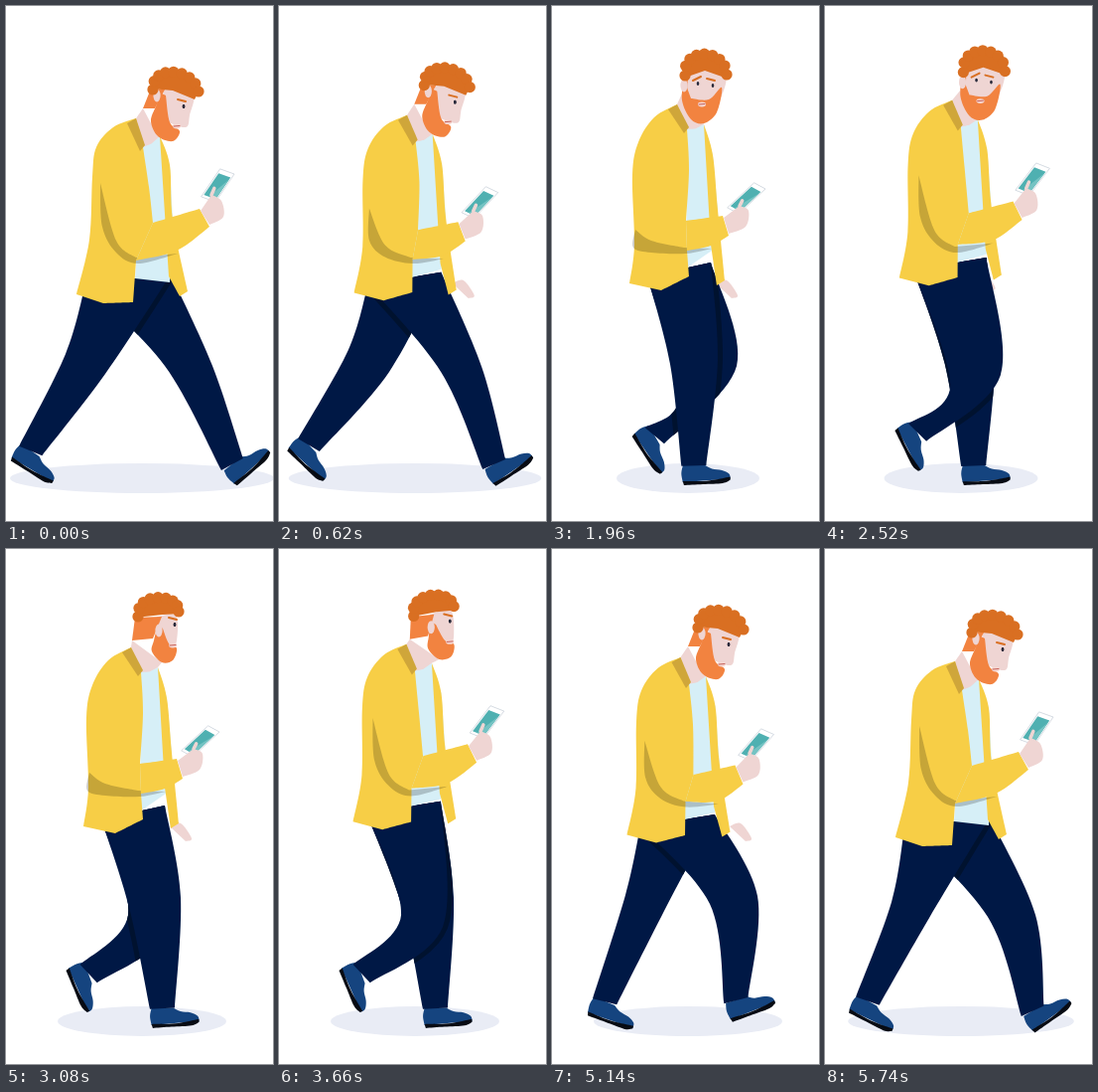
These frames come from a looping animation (269 by 518 pixels, 5760 ms). An HTML page with a canvas:

```html
<!DOCTYPE html>
<html lang="en">
<head>
<meta charset="utf-8">
<title>Walking with a phone</title>
<style>
html, body { margin: 0; width: 100%; height: 100%; overflow: hidden; background: #fff; }
canvas { display: block; width: 269px; height: 518px; }
</style>
</head>
<body>
<canvas id="stage"></canvas>
<script>
const W = 269, H = 518, LOOP = 5760, STEP = 580, TICK = 20;
const canvas = document.getElementById('stage');
const ctx = canvas.getContext('2d');
const ratio = window.devicePixelRatio || 1;
canvas.width = W * ratio;
canvas.height = H * ratio;

const YELLOW = '#f7ce46', NAVY = '#001845', DARK_NAVY = '#00122f', SHOE = '#15447f', SOLE = '#070b14';
const SKIN = '#efd5d3', HAIR = '#d96f22', BEARD = '#f28340', SHIRT = '#d6eff7';

// Two torso poses: phone raised while leaning, and upright with the arm low.
const TRUNK = { back: 6, hem: 3, edge: 2, panel: 5, hips: 2 };
const ARM = { cuff: 4, hand: 3, phone: 3 };
const trunkLean = [
  131,113, 108,122, 91,142, 87,172, 84,235, 71,290,
  98,299, 128,298, 131,256, 144,182, 138,142,
  155,131, 165,160, 168,215, 183,287, 164,272, 80,280, 166,270];
const trunkTall = [
  126,99, 103,112, 87,137, 81,170, 83,240, 78,279,
  110,286, 138,272, 136,246, 138,165, 136,124,
  153,119, 162,150, 167,205, 174,276, 160,240, 96,272, 160,258];
const armHigh = [148,218, 195,204, 205,222, 172,246, 219,212, 217,196, 207,190, 216,164, 230,169, 197,192];
const armLow = [135,216, 172,211, 178,231, 160,241, 195,222, 198,206, 189,201, 204,178, 215,184, 177,203];
const shadeHigh = [95,178, 97,222, 111,248, 133,259];
const shadeLow = [84,225, 82,243, 100,248, 135,249];

// Phase in steps: upright, shift x, shift y, arm low, arm drop, far hand shift.
const BODY = [
  [0, 0, 0, 0, 0, 0, -30], [.138, .25, 0, -7, .1, 0, -30], [.45, .65, 0, -10, .3, 2, -8],
  [.862, .5, 1, 3, .5, 7, 14], [1, .4, 1, 7, .6, 5, 12], [1.138, .75, .5, 1.5, .75, 3, 7],
  [1.31, 1, 0, 0, 1, 0, 0], [1.379, 1, 0, 0, 1, 0, 0], [1.65, .5, 0, -2, .5, 0, -14],
  [1.897, 0, 0, 0, 0, 0, -30]];

// Phase: knee x, y, half width, tilt, heel x, y, sole angle.
const LEG = [
  [0, 184,362, 24, 0, 232,483, -41], [.138, 181,369, 18, -5, 196,484, -23],
  [.31, 150,355, 26, -5, 147,482, -4], [.379, 143,358, 24, -2, 132,482, -3],
  [.862, 92,359, 18, 11, 35,469, 20], [.897, 86,363, 19, 8, 23,466, 27],
  [1, 80,360, 20, 10, 4,457, 32], [1.138, 105,357, 21, 11, 18,437, 55],
  [1.31, 144,374, 21, 6, 60,423, 67], [1.379, 157,377, 29, -15, 80,432, 57],
  [1.6, 174,364, 24, -11, 140,462, 15], [1.862, 183,353, 24, -4, 181,476, -20],
  [1.897, 188,369, 24, -1, 211,487, -35]];

const SHADOW = [[0, 133], [.138, 116], [.31, 85], [.379, 72], [.6, 66], [.862, 95], [.897, 114]];

const HEAD = { curve: 4, fringe: 3, side: 3, ear: 1, face: 5, beard: 8, eyes: 2, mouth: 1 };
const down = [
  140,68, 138,42, 182,46, 186,70, 182,78, 160,69, 138,67,
  130,87, 142,87, 152,68, 144,74,
  150,67, 180,71, 177,94, 173,106, 153,100,
  149,72, 143,85, 138,100, 145,115, 160,120, 167,110, 157,101, 153,74,
  171,85, 171,85, 164,105];
const front = [
  134,70, 130,40, 176,42, 176,69, 174,72, 154,65, 134,72,
  131,88, 136,86, 137,70, 133,80,
  136,66, 173,66, 171,90, 155,106, 136,96,
  133,74, 131,95, 140,114, 153,118, 166,107, 171,82, 158,94, 140,93,
  162,80, 147,78, 151,99];
const away = [
  133,68, 130,42, 176,44, 174,63, 178,65, 158,66, 130,69,
  127,92, 148,90, 157,68, 154,82,
  152,68, 171,67, 172,92, 165,105, 154,95,
  153,76, 149,92, 147,103, 157,114, 168,112, 172,100, 164,95, 158,80,
  170,76, 170,76, 168,97];

// The lifted face is the lowered one tipped back.
const TIP = -.61;
const up = down.map((v, i) => {
  const x = (i % 2 ? down[i - 1] : v) - 163, y = (i % 2 ? v : down[i + 1]) - 69;
  return i % 2 ? 63 + x * Math.sin(TIP) + y * Math.cos(TIP) : 139.5 + x * Math.cos(TIP) - y * Math.sin(TIP);
});

// Head turns: start, end, from, to.
const TURNS = [[1260, 1560, down, front], [2500, 2900, front, away], [3500, 4000, away, up], [4800, 5120, up, down]];

// Cyclic Hermite interpolation; each key is [time, ...values].
function sample(keys, t, period) {
  const n = keys.length;
  const time = j => keys[(j + n) % n][0] + Math.floor(j / n) * period;
  const val = (j, k) => keys[(j + n) % n][k];
  let i = n - 1;
  while (keys[i][0] > t) i--;
  const span = time(i + 1) - time(i), u = (t - time(i)) / span;
  const slope = (j, k) => (val(j + 1, k) - val(j - 1, k)) / (time(j + 1) - time(j - 1)) * span;
  const u2 = u * u, u3 = u2 * u;
  return keys[0].slice(1).map((_, m) => {
    const k = m + 1;
    return (2 * u3 - 3 * u2 + 1) * val(i, k) + (u3 - 2 * u2 + u) * slope(i, k)
      + (3 * u2 - 2 * u3) * val(i + 1, k) + (u3 - u2) * slope(i + 1, k);
  });
}

const blend = (a, b, u, dx = 0, dy = 0) => a.map((v, i) => v + (b[i] - v) * u + (i % 2 ? dy : dx));

function unpack(list, sizes) {
  const out = {};
  let at = 0;
  for (const name in sizes) {
    out[name] = Array.from({ length: sizes[name] }, () => [list[at++], list[at++]]);
  }
  return out;
}

// Smooth chains joined by straight lines into one closed path.
function outline(...chains) {
  const path = new Path2D();
  chains.forEach((pts, c) => {
    if (c) path.lineTo(...pts[0]); else path.moveTo(...pts[0]);
    for (let i = 0; i < pts.length - 1; i++) {
      const a = pts[i], b = pts[i + 1], p = pts[i - 1] || a, q = pts[i + 2] || b;
      path.bezierCurveTo(a[0] + (b[0] - p[0]) / 6, a[1] + (b[1] - p[1]) / 6,
        b[0] - (q[0] - a[0]) / 6, b[1] - (q[1] - a[1]) / 6, b[0], b[1]);
    }
  });
  path.closePath();
  return path;
}

function fill(color, ...chains) {
  ctx.fillStyle = color;
  ctx.fill(outline(...chains));
}

function poly(color, pts) {
  fill(color, ...pts.map(p => [p]));
}

function oval(color, x, y, rx, ry = rx) {
  ctx.fillStyle = color;
  ctx.beginPath();
  ctx.ellipse(x, y, rx, ry, 0, 0, 7);
  ctx.fill();
}

function line(color, width, a, b) {
  ctx.strokeStyle = color;
  ctx.lineWidth = width;
  ctx.beginPath();
  ctx.moveTo(...a);
  ctx.lineTo(...b);
  ctx.stroke();
}

const shift = (p, x, y) => [p[0] + x, p[1] + y];
const mix = (a, b, u) => [a[0] + (b[0] - a[0]) * u, a[1] + (b[1] - a[1]) * u];

function leg(phase, hips) {
  const [kx, ky, half, tilt, hx, hy, deg] = sample(LEG, phase, 2);
  const angle = deg * Math.PI / 180, c = Math.cos(angle), s = Math.sin(angle);
  const ankle = [hx + 12 * c + 20 * s, hy + 12 * s - 20 * c + 1];
  const cx = 12.5 * Math.cos(angle * .7), cy = 12.5 * Math.sin(angle * .7);
  return {
    path: outline([hips[0], [kx - half, ky - tilt], shift(ankle, -cx, -cy)],
      [shift(ankle, cx, cy), [kx + half, ky + tilt], hips[1]]),
    heel: [hx, hy], angle
  };
}

function shoe({ heel, angle }) {
  ctx.save();
  ctx.translate(...heel);
  ctx.rotate(angle);
  fill(SHOE, [[0, -3], [-1, -12], [1, -20]], [[23, -19], [30, -15], [40, -13], [47, -9], [48, -4]]);
  fill(SOLE, [[0, -4], [20, -3], [34, -4], [48, -6]], [[48, -3], [40, 0], [20, 0], [1, 0]]);
  ctx.restore();
}

function drawLegs(p, hips) {
  const far = leg(p, hips), near = leg((p + 1) % 2, hips);
  shoe(far);
  ctx.fillStyle = NAVY;
  ctx.fill(far.path);
  ctx.save();
  ctx.clip(far.path);
  ctx.strokeStyle = DARK_NAVY;
  ctx.lineWidth = 10;
  ctx.stroke(near.path);
  ctx.restore();
  shoe(near);
  ctx.fillStyle = NAVY;
  ctx.fill(near.path);
}

function drawPhone([tl, tr, bl]) {
  const at = (u, v) => shift(tl, (tr[0] - tl[0]) * u + (bl[0] - tl[0]) * v, (tr[1] - tl[1]) * u + (bl[1] - tl[1]) * v);
  const frame = outline([tl], [tr], [at(1, 1)], [bl]);
  ctx.fillStyle = '#fff';
  ctx.fill(frame);
  ctx.strokeStyle = '#c3ccd6';
  ctx.lineWidth = .7;
  ctx.stroke(frame);
  poly('#4fb0b1', [at(.06, .14), at(.92, .14), at(.92, .92), at(.06, .92)]);
  poly('#75c3c3', [at(.92, .2), at(.92, .92), at(.4, .92)]);
  return at(.4, .62);
}

function drawTorso(b, nape, chin) {
  const { back, hem, edge, cuff, shade, panel, hand } = b;
  const [low, collar] = edge, waist = hem[2], cross = cuff[0];
  const [, , elbow, tail] = shade;
  poly(SHIRT, [collar, panel[0], panel[1], panel[2], shift(panel[4], 1, 6), shift(waist, -1, 18)]);
  fill(SKIN, [back[0], nape], [chin, panel[0]], [shift(mix(collar, panel[0], .5), 0, 2), collar]);
  fill(YELLOW, panel.slice(0, 4), [shift(panel[3], -8, 5), panel[4]]);
  fill(YELLOW, back, [hem[0], hem[1]], [waist], [cross, low, collar]);
  poly('#cfa63a', [shift(back[0], -9, 5), back[0], shift(collar, 2, -2), shift(collar, -3, 4)]);
  fill('rgba(0,0,0,.2)', [...shade, shift(cuff[3], 1, 3)], [shift(tail, -2, -6), shift(elbow, 0, -12), shade[0]]);
  fill(YELLOW, [cross, cuff[1]], [cuff[2], cuff[3], waist]);
  const finger = drawPhone(b.phone);
  fill(SKIN, [shift(cuff[1], 1, 2)], [shift(cuff[2], 0, -2), ...hand]);
  line(SKIN, 3.5, hand[2], finger);
}

function curlsOn([a, b, c, d]) {
  return Array.from({ length: 9 }, (_, i) => {
    const u = i / 8, ab = mix(a, b, u), bc = mix(b, c, u), cd = mix(c, d, u);
    return mix(mix(ab, bc, u), mix(bc, cd, u), u);
  });
}

function drawHead(h) {
  const curls = curlsOn(h.curve), [eye, other] = h.eyes;
  fill(SKIN, h.face);
  poly(BEARD, [h.fringe[2], ...h.side]);
  fill(BEARD, h.beard);
  oval(SKIN, ...h.ear[0], 3.6, 6.5);
  poly(HAIR, [...curls, ...h.fringe]);
  curls.forEach(c => oval(HAIR, ...c, 5.6));
  h.eyes.forEach(e => oval('#27293a', ...e, 1.3, 1.9));
  line(HAIR, 2, shift(eye, -6, -7), shift(eye, 2, -5));
  if (Math.abs(eye[0] - other[0]) > 6) line(HAIR, 2, shift(other, -5, -3), shift(other, 3, -7));
  const [x, y] = h.mouth[0];
  oval('#f6d6d0', x, y, 4, 2.4);
  line('#c4615a', 1, [x - 3, y], [x + 3, y - .5]);
}

function headAt(t) {
  let pose = down;
  for (const [start, end, from, to] of TURNS) {
    if (t < start) break;
    const u = Math.min(1, (t - start) / (end - start));
    pose = blend(from, to, u * u * (3 - 2 * u));
  }
  return pose;
}

function draw(t) {
  const p = (t / STEP) % 2;
  const [tall, dx, dy, low, drop, reach] = sample(BODY, p, 2);
  const body = {
    ...unpack(blend(trunkLean, trunkTall, tall, dx, dy), TRUNK),
    ...unpack(blend(armHigh, armLow, low, dx, dy + drop), ARM),
    ...unpack(blend(shadeHigh, shadeLow, low * low, dx, dy), { shade: 4 })
  };
  const pose = headAt(t);
  const head = unpack(blend(pose, pose, 0, 8 * (1 - tall * tall) + dx, 16 * (1 - tall) + dy), HEAD);

  ctx.setTransform(ratio, 0, 0, ratio, 0, 0);
  ctx.fillStyle = '#fff';
  ctx.fillRect(0, 0, W, H);
  ctx.lineCap = 'round';
  oval('#e9ecf5', 137, 475, sample(SHADOW, p % 1, 1)[0], 15);
  ctx.save();
  ctx.translate(reach, reach < 0 ? reach / 2 : 0);
  fill(SKIN, [[165, 279], [176, 276], [187, 291], [181, 294]]);
  ctx.restore();
  drawLegs(p, body.hips);
  drawTorso(body, head.side[0], head.beard[3]);
  drawHead(head);
}

let begin;
function tick(now) {
  if (begin === undefined) begin = now;
  draw(Math.floor(((now - begin) % LOOP) / TICK) * TICK);
  requestAnimationFrame(tick);
}
draw(0);
requestAnimationFrame(tick);
</script>
</body>
</html>
```
